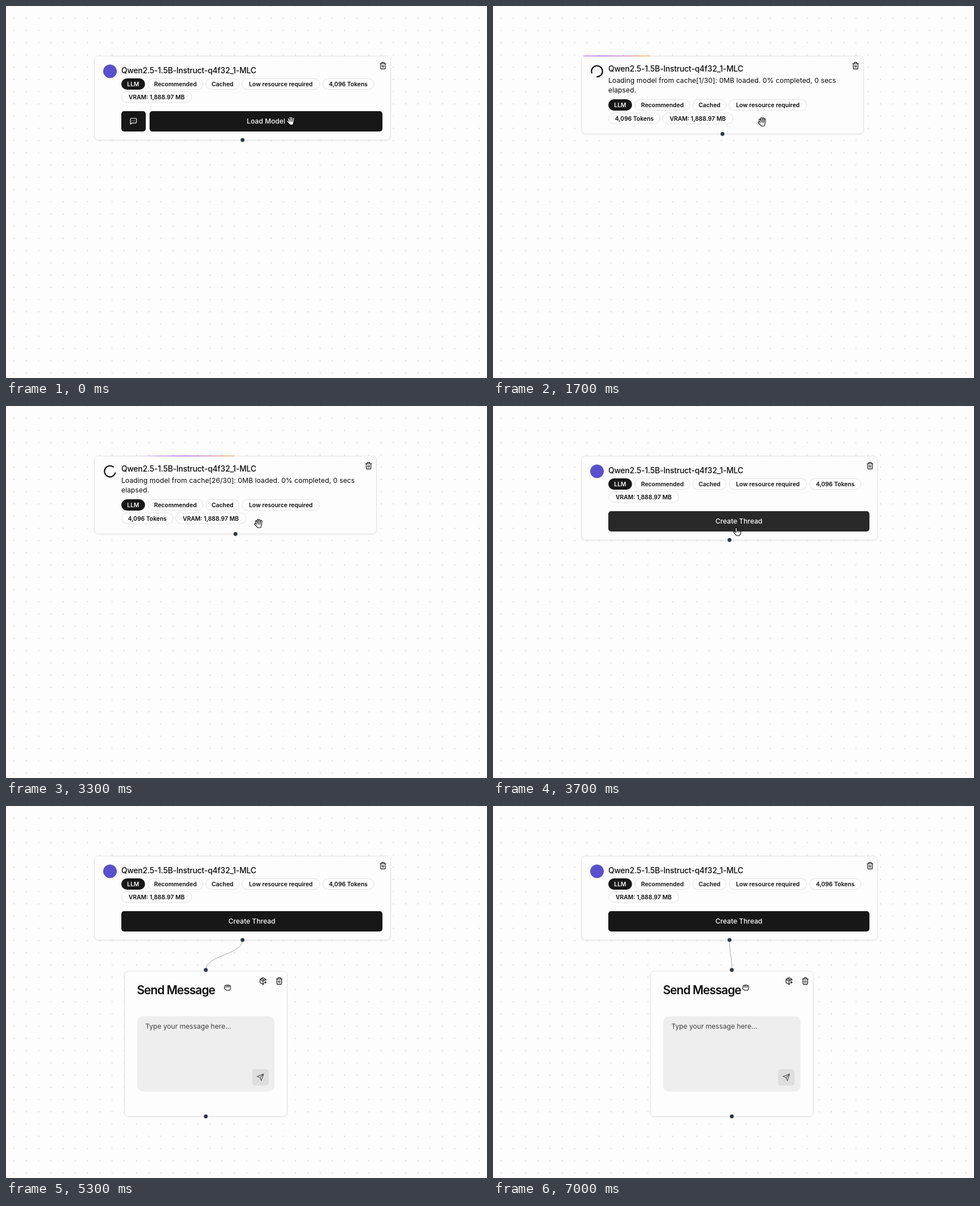
Recreate the animation shown at these times as an HTML page. Size 851x658 px, loop 7100 ms.

```html
<!DOCTYPE html>
<html lang="en">
<head>
<meta charset="utf-8">
<title>Model card flow</title>
<style>
html, body { margin: 0; width: 100%; height: 100%; overflow: hidden; background: #fdfdfd; }
svg { display: block; }
text { font-family: Inter, "Liberation Sans", sans-serif; font-size: 12.12px; fill: #0a0a0a; font-optical-sizing: none; white-space: pre; }
.title { font-size: 13.86px; font-weight: 500; letter-spacing: -.011em; }
.heading { font-size: 20.8px; font-weight: 600; letter-spacing: -.041em; }
.note { letter-spacing: .0075em; }
.tag { font-size: 10.39px; font-weight: 600; text-anchor: middle; }
.label { font-weight: 500; text-anchor: middle; fill: #fafafa; }
.card { fill: #fdfdfd; stroke: #e2e2e2; filter: drop-shadow(0 1px 1px rgba(0, 0, 0, .05)); }
.dark { fill: #171717; }
.knob { fill: #2a3547; stroke: #fdfdfd; stroke-width: .8; }
.icon { fill: none; stroke: #0a0a0a; stroke-width: 2; stroke-linecap: round; stroke-linejoin: round; }
.pale .icon { stroke: #fafafa; }
.faded .icon { stroke: #cfcfcf; }
.hand path { stroke-linecap: round; stroke-linejoin: round; }
.ink { fill: #000; stroke: #000; stroke-width: 3.6; }
.skin { fill: #fff; stroke: #fff; stroke-width: 1.5; }
</style>
</head>
<body>
<svg id="stage" width="851" height="658" viewBox="0 0 851 658">
  <defs>
    <pattern id="dots" x="3.6" y="-10.8" width="21.65" height="21.64" patternUnits="userSpaceOnUse">
      <circle cx="10.8" cy="10.8" r=".62" fill="#91919a"/>
    </pattern>
    <linearGradient id="glow">
      <stop offset="0" stop-color="#9c40ff" stop-opacity="0"/>
      <stop offset=".5" stop-color="#9c40ff"/>
      <stop offset="1" stop-color="#ffaa40"/>
    </linearGradient>
    <clipPath id="top"><rect x="160" y="87" width="492" height="3"/></clipPath>
  </defs>
  <rect width="851" height="658" fill="url(#dots)"/>
  <g id="wide"></g>
  <g id="narrow"></g>
  <path id="edge" fill="none" stroke="#a4a4aa"/>
  <circle id="joint" class="knob" r="3.9"/>
  <g id="node"></g>
  <g id="cursor"></g>
</svg>
<script>
const LOOP = 7100, STEP = 100;
const NAME = "Qwen2.5-1.5B-Instruct-q4f32_1-MLC";
const $ = id => document.getElementById(id);

const ICONS = {
  trash: "M3 6h18M19 6v14a2 2 0 0 1-2 2H7a2 2 0 0 1-2-2V6M8 6V4a2 2 0 0 1 2-2h4a2 2 0 0 1 2 2v2M10 11v6M14 11v6",
  chat: "M21 15a2 2 0 0 1-2 2H7l-4 4V5a2 2 0 0 1 2-2h14a2 2 0 0 1 2 2zM8 10h.01M12 10h.01M16 10h.01",
  send: "m22 2-7 20-4-9-9-4ZM22 2 11 13",
  box: "M16 16h6M19 13v6M21 10V8a2 2 0 0 0-1-1.73l-7-4a2 2 0 0 0-2 0l-7 4A2 2 0 0 0 3 8v8a2 2 0 0 0 1 1.73l7 4a2 2 0 0 0 2 0l2-1.14M7.5 4.27l9 5.15M3.29 7 12 12l8.71-5M12 22V12",
  arc: "M21 12a9 9 0 1 1-6.219-8.56"
};
const HANDS = {
  open: "M-4.6-3.8L-2.4 2M-1.4-6.2L-.8 1M1.6-6L1.6 1M4.7-4.2L3.9 2M-6 .8L-2.6 4.6M-2 2.4H3.6L2.8 6H-1Z",
  point: "M-1.5-6V2M1-1V2M3.4-.6V2M5.4 .4V3M-4.8 .6L-2 4.2M-1.5 2H5L3.6 5.6H-.6Z",
  closed: "M-3.6-2.4V1M-1.1-3.2V1M1.5-3.2V1M4-2.2V1M-4.5 1.2L-2.4 3M-3 1H4L3 3.8H-1.8Z"
};

const rect = (x, y, w, h, r, attrs) =>
  `<rect x="${x}" y="${y}" width="${w}" height="${h}" rx="${r}" ${attrs}/>`;
const text = (x, y, str, cls = "", attrs = "") =>
  `<text x="${x}" y="${y}" class="${cls}" ${attrs}>${str}</text>`;
const knob = (x, y) => `<circle class="knob" cx="${x}" cy="${y}" r="3.9"/>`;
const icon = (name, x, y, size = 14, attrs = "") =>
  `<g transform="translate(${x} ${y}) scale(${size / 24})"><g ${attrs}>` +
  `<path class="icon" transform="translate(-12 -12)" d="${ICONS[name]}"/></g></g>`;

function tag(x, y, w, str, dark) {
  const pill = dark ? rect(x, y, w, 20, 10, 'class="dark"')
    : rect(x + .5, y + .5, w - 1, 19, 9.5, 'fill="#fdfdfd" stroke="#e2e2e2"');
  return pill + text(x + w / 2, y + 13.9, str, "tag", dark ? 'style="fill:#fafafa"' : "");
}
const mainTags = y => tag(204, y, 42, "LLM", true) + tag(250.5, y, 98.5, "Recommended") +
  tag(353, y, 60, "Cached") + tag(417, y, 138.5, "Low resource required");

$("wide").innerHTML =
  rect(156.5, 88.5, 524, 148.5, 7, 'class="card"') +
  '<circle cx="184" cy="115.5" r="12" fill="#5a4fcf"/>' +
  text(204, 119, NAME, "title") +
  icon("trash", 667, 105.5, 14, 'id="bin"') +
  mainTags(128) + tag(559.5, 128, 92, "4,096 Tokens") + tag(204, 151, 125, "VRAM: 1,888.97 MB") +
  '<g id="load">' + rect(204, 186, 43.3, 36, 5, 'class="dark"') +
  icon("chat", 225.5, 204, 14, 'class="pale"') +
  rect(254, 186, 412, 36, 5, 'class="dark" id="loadBtn"') +
  text(460, 208, "Load Model", "label") + "</g>" +
  '<g id="busy">' + rect(204, 186, 462, 36, 5, 'fill="#808080"') +
  icon("arc", 435, 204, 14, 'id="spinSmall" class="faded"') + "</g>" +
  '<g id="create">' + rect(204, 186, 462, 36, 5, 'class="dark" id="createBtn"') +
  text(435, 208, "Create Thread", "label") + "</g>";

$("narrow").innerHTML =
  rect(156.5, 88.5, 499, 137.5, 7, 'class="card" id="frame"') +
  '<g clip-path="url(#top)"><rect id="beam" y="87.8" width="173" height="1.2" fill="url(#glow)"/></g>' +
  icon("arc", 184, 115.5, 26, 'id="spinBig"') +
  text(204, 116.2, NAME, "title") +
  icon("trash", 641.5, 105.5) +
  '<g id="info">' + text(204, 135.5, "", "note", 'id="progress"') +
  text(204, 153, "elapsed.", "note") + "</g>" +
  '<g id="tags">' + mainTags(165) + tag(204, 188.7, 92, "4,096 Tokens") +
  tag(299.5, 188.7, 125.5, "VRAM: 1,888.97 MB") + "</g>";

// Message node, drawn from its own left edge
$("node").innerHTML =
  rect(.5, 292, 288, 257, 7, 'class="card"') +
  text(22.7, 332.6, "Send Message", "heading") +
  icon("box", 245.7, 309.5) + icon("trash", 274.5, 309.5) +
  rect(23, 372, 243, 133, 10, 'fill="#eeeeee"') +
  text(37.5, 394.2, "Type your message here...", "", 'style="fill:#404040"') +
  rect(226.5, 465.5, 29, 29, 5, 'fill="#dedede"') +
  icon("send", 241, 480, 14, 'opacity=".65"') +
  knob(144.5, 290) + knob(144.5, 549);

$("cursor").innerHTML = Object.entries(HANDS).map(([kind, d]) =>
  `<g class="hand" id="${kind}"><path class="ink" d="${d}"/><path class="skin" d="${d}"/></g>`).join("");

const PATH = [[0, 504, 203], [300, 504, 203], [500, 477, 205], [2400, 476, 205], [2800, 458, 220],
  [3300, 447, 208], [3800, 428, 226], [4200, 430, 211], [4800, 430, 211], [5100, 339, 321]];
const DRAG = [[5100, 156], [5200, 176], [5300, 209], [5400, 244], [5500, 267], [5600, 267],
  [5700, 264], [6700, 264], [6800, 266], [6900, 271], [7000, 278]];

function at(keys, t, col = 1) {
  const i = keys.findIndex(k => k[0] > t);
  if (i < 0) return keys[keys.length - 1][col];
  if (i === 0) return keys[0][col];
  const a = keys[i - 1], b = keys[i];
  return a[col] + (b[col] - a[col]) * (t - a[0]) / (b[0] - a[0]);
}
const show = (id, on) => { $(id).style.display = on ? "" : "none"; };
const set = (id, name, value) => $(id).setAttribute(name, value);

function draw(t) {
  const loading = t >= 1400 && t < 3700;
  const busy = t >= 700 && t < 1400;
  const filled = t >= 1500;

  show("wide", !loading);
  show("narrow", loading);
  show("load", t < 700);
  show("busy", busy);
  show("create", t >= 3700);
  set("bin", "opacity", busy ? .8 : 1);
  $("loadBtn").style.fill = t < 400 ? "#171717" : t < 500 ? "#202020" : "#282828";
  $("createBtn").style.fill = t < 4900 ? "#282828" : "#171717";
  set("spinSmall", "transform", `rotate(${216 + (t - 1200) * .36})`);

  set("spinBig", "transform", `rotate(${54 + (t - 2400) * .36})`);
  set("beam", "x", 160 + (t - 2400) * .078);
  set("frame", "height", filled ? 137.5 : 100.5);
  set("tags", "transform", `translate(0 ${filled ? 0 : -37})`);
  show("info", filled);
  const count = Math.min(30, Math.max(1, Math.round(12 + (t - 2400) * .01556)));
  $("progress").textContent = `Loading model from cache[${count}/30]: 0MB loaded. 0% completed, 0 secs`;

  set("joint", "cx", loading ? 406 : 418.5);
  set("joint", "cy", loading ? (filled ? 226.3 : 189.3) : 237);

  const left = at(DRAG, t), mid = left + 144.5;
  show("node", t >= 4500);
  set("node", "transform", `translate(${left} 0)`);
  show("edge", t >= 4600);
  set("edge", "d", `M418.5 237C418.5 263.5 ${mid} 263.5 ${mid} 290`);

  // The pointer lags behind the last pull of the node
  const x = t < 5100 ? at(PATH, t) : (t < 6700 ? left : 264) + 183;
  set("cursor", "transform", `translate(${x} ${at(PATH, t, 2)})`);
  const point = (t >= 400 && t < 700) || (t >= 3700 && t < 4900);
  const kind = t >= 5100 ? "closed" : point ? "point" : "open";
  for (const k in HANDS) show(k, k === kind);
}

const start = performance.now();
function tick() {
  const t = (performance.now() - start) % LOOP;
  draw(Math.floor(t / STEP) * STEP);
  requestAnimationFrame(tick);
}
tick();
</script>
</body>
</html>
```
